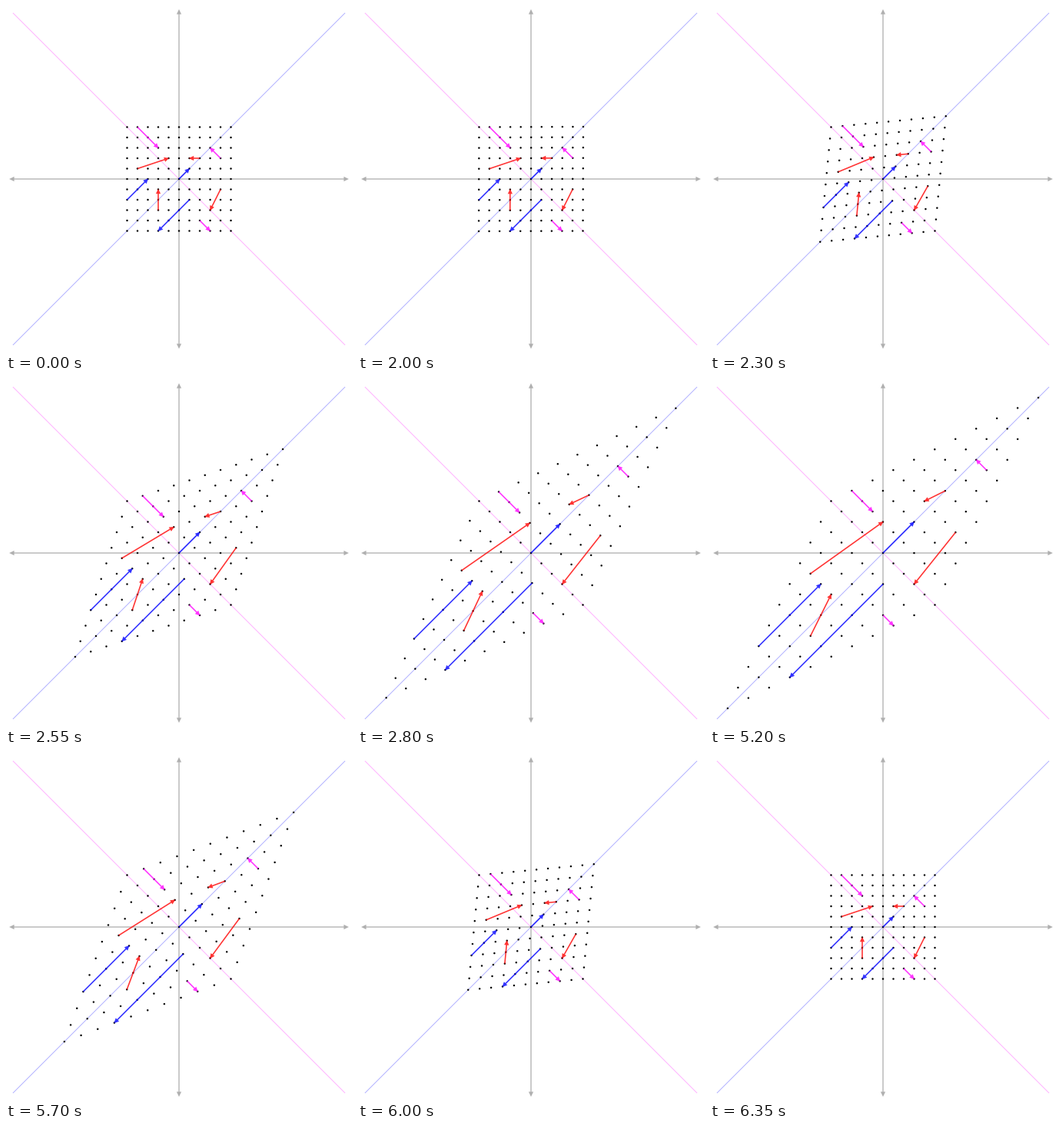
Write a matplotlib script that moves like this. It is 450x450 px and loops after 6.4 s.

```python
import numpy as np
import matplotlib.pyplot as plt
from matplotlib.animation import FuncAnimation
from matplotlib.collections import PolyCollection
from matplotlib.patches import Polygon

SIZE = 450
UNIT = 13.5
HOLD, MOVE = 40, 24
STEP_MS = 50

BLUE, RED, MAGENTA = "#0000ff", "#ff0000", "#ff00ff"
VECTORS = [
    (BLUE, (0, 0), (1, 1)),
    (BLUE, (-5, -2), (-3, 0)),
    (BLUE, (1, -2), (-2, -5)),
    (MAGENTA, (-4, 5), (-2, 3)),
    (MAGENTA, (4, 2), (3, 3)),
    (MAGENTA, (2, -4), (3, -5)),
    (RED, (-4, 1), (-1, 2)),
    (RED, (2, 2), (1, 2)),
    (RED, (-2, -3), (-2, -1)),
    (RED, (4, -1), (3, -3)),
]
SHEAR = np.array([[2, 1], [1, 2]])

fig = plt.figure(figsize=(SIZE / 100, SIZE / 100), dpi=100, facecolor="white")
ax = fig.add_axes([0, 0, 1, 1])
ax.set_xlim(-SIZE / 2, SIZE / 2)
ax.set_ylim(-SIZE / 2, SIZE / 2)
ax.axis("off")


def smooth(x, steep=10):
    """Normalised logistic ease from 0 to 1."""
    def sig(v):
        return 1 / (1 + np.exp(-v))
    low = sig(-steep / 2)
    return (sig(steep * (x - 0.5)) - low) / (1 - 2 * low)


def progress(i):
    if i < HOLD:
        return 0.0
    if i < HOLD + MOVE:
        return smooth((i - HOLD + 1) / MOVE)
    if i < 2 * HOLD + MOVE:
        return 1.0
    return 1 - smooth((i - 2 * HOLD - MOVE + 1) / MOVE)


def arrow(tail, tip, width=1.6, head=6.5, half=3.1, over=0.8):
    """Outline of an arrow in pixels."""
    tail, tip = np.asarray(tail, float), np.asarray(tip, float)
    length = np.hypot(*(tip - tail))
    u = (tip - tail) / length
    n = np.array([-u[1], u[0]])
    end, w = length + over, width / 2
    neck = end - head
    outline = [(0, w), (neck, w), (neck, half), (end, 0),
               (neck, -half), (neck, -w), (0, -w)]
    return np.array([tail + a * u + b * n for a, b in outline])


def add_arrow(points, **style):
    return ax.add_patch(Polygon(points, closed=True, lw=0, snap=False, **style))


for slope, color in ((1, BLUE), (-1, MAGENTA)):
    ax.plot([-216, 216], [-216 * slope, 216 * slope], color=color,
            alpha=0.3, lw=0.72, solid_capstyle="butt", zorder=1)

for end in ((220, 0), (-220, 0), (0, 220), (0, -220)):
    add_arrow(arrow((0, 0), end, width=1.3), fc="#b0b0b0", zorder=2)

angles = np.linspace(0, 2 * np.pi, 16, endpoint=False)
disc = 1.25 * np.column_stack([np.cos(angles), np.sin(angles)])
span = np.arange(-5, 6)
grid = np.array([(x, y) for x in span for y in span])

dots = PolyCollection([disc], facecolors="black", linewidths=0, zorder=3)
dots.set_snap(False)
ax.add_collection(dots, autolim=False)
arrows = [add_arrow(arrow((0, 0), (1, 1)), fc=color, alpha=0.8, zorder=4)
          for color, _, _ in VECTORS]


def draw(i):
    t = progress(i)
    m = UNIT * ((1 - t) * np.eye(2) + t * SHEAR)
    centres = grid @ m.T
    dots.set_verts(centres[:, None, :] + disc)
    for patch, (_, tail, tip) in zip(arrows, VECTORS):
        patch.set_xy(arrow(m @ tail, m @ tip))
    return [dots, *arrows]


anim = FuncAnimation(fig, draw, frames=2 * (HOLD + MOVE), interval=STEP_MS,
                     repeat=True, repeat_delay=0, blit=False)
plt.show()
```
